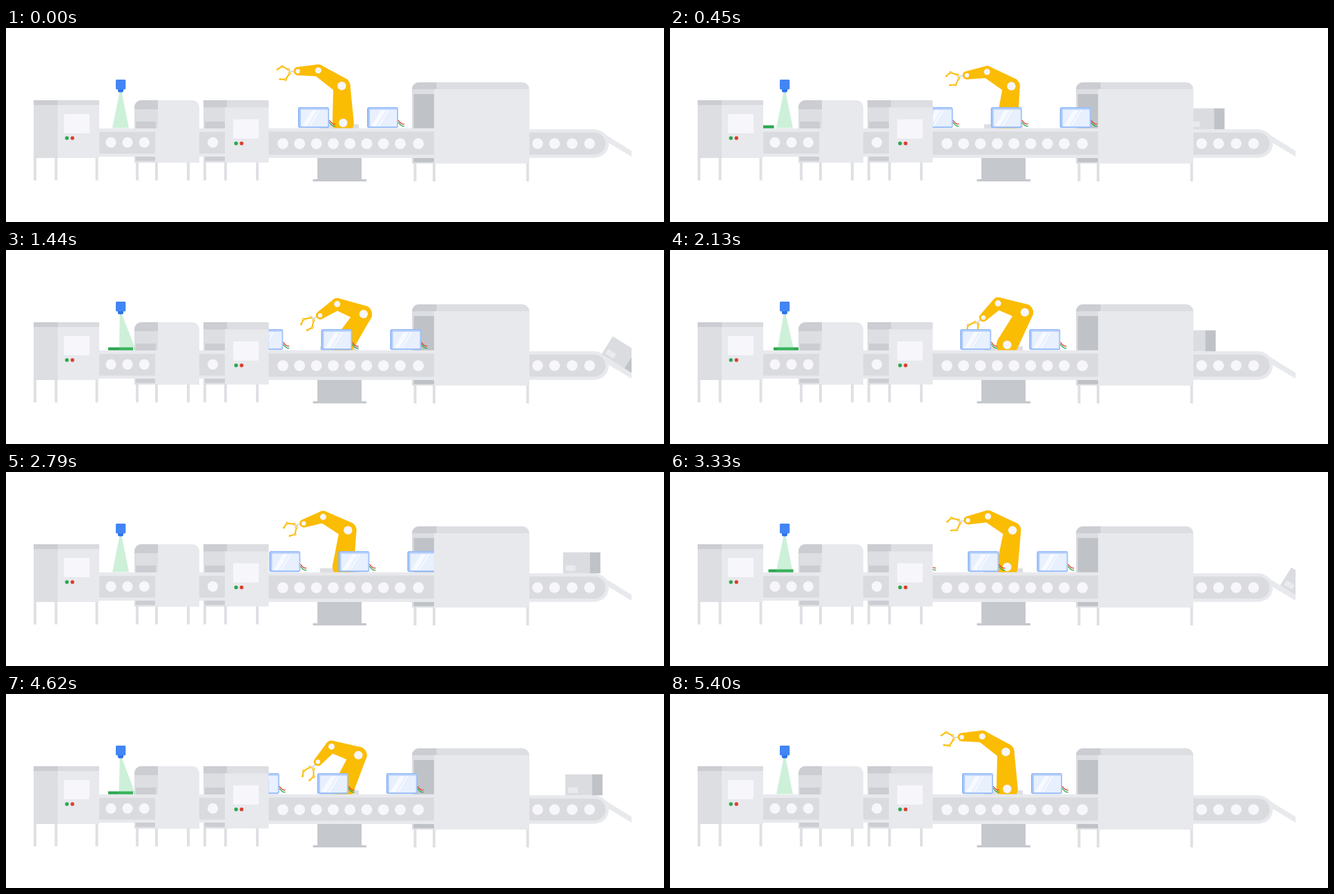
Animation, 953 px wide and 282 px high, one loop 5430 ms. Source, as an HTML page with a canvas:

```html
<!DOCTYPE html>
<html lang="en">
<head>
<meta charset="utf-8">
<title>Assembly line</title>
<style>
html, body { margin: 0; width: 100%; height: 100%; overflow: hidden; background: #fff; }
canvas { display: block; width: 953px; height: 282px; }
</style>
</head>
<body>
<canvas id="stage" width="953" height="282"></canvas>
<script>
const ctx = document.getElementById('stage').getContext('2d');
const LOOP = 5430, STEP = 30, RUN = 5400, RAD = Math.PI / 180;
const C = {
  body: '#e8e9ed', side: '#dcdee2', belt: '#dadbdf', cap: '#cbcdd2', leg: '#dee0e4',
  hole: '#cbcdd2', deep: '#bfc3c7', pale: '#f6f6fb', plinth: '#c5c8cd',
  arm: '#fbbc04', green: '#2ba84e', red: '#dc3f2e', blue: '#4285f4'
};

function rect(x0, y0, x1, y1, fill, radii = 0) {
  ctx.fillStyle = fill;
  ctx.beginPath();
  ctx.roundRect(x0, y0, x1 - x0, y1 - y0, radii);
  ctx.fill();
}

function dot(x, y, r, fill) {
  ctx.fillStyle = fill;
  ctx.beginPath();
  ctx.arc(x, y, r, 0, 7);
  ctx.fill();
}

function poly(points, fill) {
  ctx.fillStyle = fill;
  ctx.beginPath();
  points.forEach(p => ctx.lineTo(p[0], p[1]));
  ctx.fill();
}

function clipped(x0, y0, x1, y1, draw) {
  ctx.save();
  ctx.beginPath();
  ctx.rect(x0, y0, x1 - x0, y1 - y0);
  ctx.clip();
  draw();
  ctx.restore();
}

const legs = (y0, y1, xs) => xs.forEach(x => rect(x, y0, x + 4, y1, C.leg));
const rollers = (y, r, xs) => xs.forEach(x => dot(x, y, r, C.pale));

function panel(x, y) {
  rect(x, y, x + 37, y + 28, C.pale, 1);
  dot(x + 4.2, y + 35, 2.7, C.green);
  dot(x + 12.2, y + 35, 2.7, C.red);
}

// Cubic interpolation through rows of [time, ...values]; flat at turning points.
function track(rows, t) {
  let i = 0;
  while (i < rows.length - 2 && t >= rows[i + 1][0]) i++;
  const a = rows[i], b = rows[i + 1], h = b[0] - a[0], u = (t - a[0]) / h;
  const slope = (k, c) => {
    if (k < 1 || k > rows.length - 2) return 0;
    const p = rows[k - 1], q = rows[k], n = rows[k + 1];
    const d0 = (q[c] - p[c]) / (q[0] - p[0]), d1 = (n[c] - q[c]) / (n[0] - q[0]);
    return d0 * d1 <= 0 ? 0 : 2 * d0 * d1 / (d0 + d1);
  };
  return a.slice(1).map((v, j) => {
    const c = j + 1, w = b[c], u2 = u * u, u3 = u2 * u;
    return v * (2 * u3 - 3 * u2 + 1) + w * (3 * u2 - 2 * u3)
      + h * (slope(i, c) * (u3 - 2 * u2 + u) + slope(i + 1, c) * (u3 - u2));
  });
}

// Joint angles: lower arm, upper arm, forearm, wrist, claw axis, claw opening
const POSE = {
  high: [2.1, 33.5, 2, 2, 15, 50],
  near: [-7.5, 28.4, 18.7, 14, 36, 50],
  lift: [-24.2, 17.8, 48.4, 45, 61, 40],
  low: [-33.4, 20.8, 33.5, 24, 46, 42]
};
const armKeys = [
  [0, 'high'], [190, 'high'], [1000, 'low'], [1890, 'low'], [2260, 'lift'], [2790, 'near'],
  [3040, 'high'], [3850, 'low'], [4250, 'low'], [4620, 'lift'], [5150, 'near'], [RUN, 'high']
].map(([t, name]) => [t, ...POSE[name]]);

const boardKeys = [[0, 98], [280, 98], [720, 148], [2080, 148], [2580, 220], [2700, 220]];
const beamKeys = [[0, 166], [600, 166], [900, 151.5], [1170, 152], [1440, 176], [1920, 175.5], [2200, 166], [2700, 166]];

function limb(a, b, ra, rb) {
  const dir = Math.atan2(b[1] - a[1], b[0] - a[0]);
  const off = Math.acos((ra - rb) / Math.hypot(b[0] - a[0], b[1] - a[1]));
  ctx.fillStyle = C.arm;
  ctx.beginPath();
  ctx.arc(a[0], a[1], ra, dir + off, dir - off + 2 * Math.PI);
  ctx.arc(b[0], b[1], rb, dir - off, dir + off);
  ctx.fill();
}

// Step to the left of p, turned downwards by deg
const left = (p, len, deg) => [p[0] - len * Math.cos(deg * RAD), p[1] + len * Math.sin(deg * RAD)];

function line(points, color, width) {
  ctx.strokeStyle = color;
  ctx.lineWidth = width;
  ctx.lineCap = ctx.lineJoin = 'round';
  ctx.beginPath();
  points.forEach(p => ctx.lineTo(p[0], p[1]));
  ctx.stroke();
}

function arm(t) {
  const [lower, upper, fore, wrist, axis, open] = track(armKeys, t);
  const base = [488.3, 138];
  const s = left(base, 53.8, lower - 90);
  const e = left(s, 40.9, -upper);
  const w = left(e, 29.6, fore);
  const hub = left(w, 12.2, wrist);
  line([w, hub], '#dadce0', 2.4);
  for (const k of [-1, 1]) {
    const root = left(hub, 2.8, axis + 80 * k);
    const knuckle = left(hub, 13, axis + open * k);
    const tip = left(knuckle, 8, axis - 19 * k);
    line([root, knuckle, tip], C.arm, 2);
    for (const p of [root, knuckle]) {
      dot(p[0], p[1], 2, C.arm);
      dot(p[0], p[1], 0.8, '#fff');
    }
    dot(tip[0], tip[1], 1.4, C.arm);
  }
  clipped(300, 0, 620, 145.5, () => {
    limb(base, s, 15.5, 12.2);
    limb(s, e, 12.2, 8.7);
    limb(e, w, 8.7, 6);
    dot(...base, 6.2, C.pale);
  });
  dot(...s, 6.2, C.pale);
  dot(...e, 4.5, C.pale);
  dot(...w, 3.2, C.pale);
}

function wire(x, y, color) {
  ctx.strokeStyle = color;
  ctx.lineWidth = 1.2;
  ctx.beginPath();
  ctx.moveTo(x, y);
  ctx.bezierCurveTo(x + 4, y, x + 2, y + 5.5, x + 9.5, y + 5.5);
  ctx.stroke();
}

function tablet(x) {
  wire(x + 44, 134.2, C.red);
  wire(x + 44, 137.2, C.green);
  rect(x, 115, x + 45, 145.3, '#8ab4f8', 3);
  rect(x + 1.6, 115.8, x + 44.5, 144.2, '#aecbfa', 2.5);
  rect(x + 4, 118.6, x + 43, 143, '#e8f0fe', 1);
  poly([[x + 6, 142.5], [x + 20, 119.5], [x + 27, 119.5], [x + 13, 142.5]], '#f8faff');
  poly([[x + 16, 142.5], [x + 30, 119.5], [x + 32, 119.5], [x + 18, 142.5]], '#f8faff');
}

function carton(t) {
  const p = t % 1800;
  const slip = Math.max(0, p - 1300) / 140;
  const x = 701.2 + p * 0.1067 + 9 * slip * slip;
  const u = Math.min(1, Math.max(0, (p - 1170) / 220));
  ctx.save();
  ctx.translate(856, 147.3);
  ctx.rotate(32 * RAD * u * u * (3 - 2 * u));
  ctx.translate(x - 856, -30.5);
  rect(0, 0, 40, 30.5, '#dadce0');
  rect(39, 0, 54, 30.5, C.deep);
  rect(4, 19, 18, 27, '#e9eaed');
  ctx.restore();
}

function backs() {
  legs(189, 221.5, [40, 70.5, 129.5]);
  legs(195, 221.5, [188, 216, 262, 286, 316, 362]);
  legs(197, 223, [590.5, 618, 753.5]);
  // first machine
  rect(40, 105, 76, 189, C.side);
  rect(75, 105, 135, 189, C.body);
  rect(40, 105, 76, 112, C.cap);
  rect(75, 105, 135, 112, '#d9dbdf');
  panel(84, 125);
  // openings of the second and third
  for (const [x, r] of [[186, 10], [286, 0]]) {
    rect(x, 105, x + 36, 195.5, C.side, [r, 0, 0, 0]);
    rect(x, 105, x + 36, r ? 118 : 115.5, C.cap, [r, 0, 0, 0]);
    rect(x + 2, 136, x + 31, 193, C.hole);
  }
  // large machine
  rect(588, 79, 626, 197, C.side, [10, 0, 0, 0]);
  rect(588, 79, 626, 89, C.cap, [10, 0, 0, 0]);
  rect(590.5, 96, 620, 195, C.deep);
}

function belts() {
  rect(135, 146, 318, 187, C.body);
  rect(135, 151, 318, 182.5, C.belt);
  rollers(166.3, 7.6, [152, 176, 200.3, 299.5]);
  rect(451, 188, 515, 221, C.plinth);
  rect(444.5, 219.7, 522, 223, C.plinth);
  rect(380, 145.7, 622, 189, C.body);
  rect(380, 150.5, 622, 184.3, C.belt);
  rollers(168.2, 7.9, [401, 425.2, 449.5, 474, 498.2, 522.5, 546.7, 571, 597.3]);
  poly([[852, 147.3], [857, 148], [906, 178.5], [906, 187], [868, 164]], C.body);
  rect(750, 147.3, 873, 188.7, C.body, [0, 20.7, 20.7, 0]);
  rect(750, 152, 868.3, 184, C.belt, [0, 16, 16, 0]);
  rollers(168, 7.8, [770, 794.5, 820, 845.2]);
}

function fronts() {
  rect(216, 146, 280, 195.5, C.body);
  rect(220, 105, 280, 195.5, C.body, [0, 10, 0, 0]);
  rect(317, 115, 380.5, 195.5, C.body);
  rect(320, 105, 380.5, 115.5, '#dcdee2');
  panel(329, 132.7);
}

function bigFront() {
  rect(620, 89, 758, 197, C.body);
  rect(623.5, 79, 758, 89, '#dcdee2', [0, 10, 0, 0]);
}

function scanner(x) {
  poly([[164.8, 92], [167.4, 92], [x + 12, 145.5], [x - 12, 145.5]], 'rgba(90,205,130,.3)');
  rect(162, 87, 170, 93.5, '#2b74ea', 2.5);
  rect(159, 75, 173.3, 89.3, C.blue, 1.5);
}

function draw(t) {
  ctx.fillStyle = '#fff';
  ctx.fillRect(0, 0, 953, 282);
  backs();
  belts();
  const phase = t % 2700;
  const [board] = track(boardKeys, phase);
  clipped(135, 130, 217, 150, () => rect(board, 141.5, board + 36, 145.8, C.green));
  fronts();
  rect(455, 140, 511, 146, C.side);
  arm(t);
  clipped(380.5, 100, 620, 160, () => {
    for (let x = 323 + (t * 500 / RUN) % 100; x < 640; x += 100) tablet(x);
  });
  bigFront();
  clipped(758, 60, 906, 230, () => carton(t));
  scanner(track(beamKeys, phase)[0]);
}

const start = performance.now();
function tick() {
  const t = (performance.now() - start) % LOOP;
  draw(Math.floor(t / STEP) * STEP);
  requestAnimationFrame(tick);
}
tick();
</script>
</body>
</html>
```
